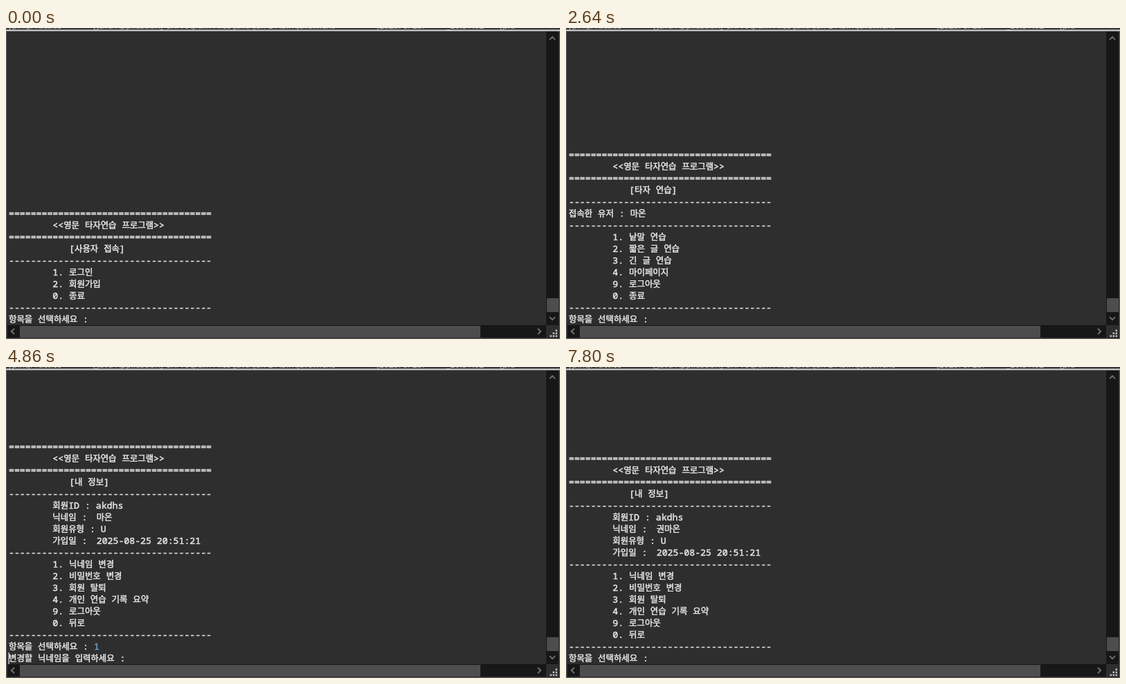
Recreate the animation shown at these times as an HTML page with a canvas. Size 800 by 450 pixels, loop 8 s.

```html
<!DOCTYPE html>
<html lang="ko">
<head>
<meta charset="utf-8">
<title>영문 타자연습 프로그램</title>
<style>
  html, body { margin: 0; width: 100%; height: 100%; overflow: hidden; background: #2f2e2f; }
  canvas { display: block; width: 800px; height: 450px; }
</style>
</head>
<body>
<canvas id="stage" width="800" height="450"></canvas>
<script>
const ctx = document.getElementById('stage').getContext('2d');
const LOOP = 8000;
const CELL = 7.92, WIDE = 11.4, LEFT = 4, ROW = 17, BASE = 426;
const BG = '#2f2e2f', TEXT = '#e6e6e6', INPUT = '#6f9fc4';
const TRACK = '#171717', THUMB = '#4d4d4d', ARROW = '#767676';
const LATIN = '13.2px "Noto Sans Mono", monospace';
const HANGUL = '12.4px "Noto Sans CJK KR", "Noto Sans CJK", sans-serif';

// --- Console contents. "|" starts typed input, a second "|" the syllable being composed.
const BAR = '='.repeat(37), RULE = '-'.repeat(37);
const ASK = '항목을 선택하세요 : ';
const head = title => [BAR, '\t<<영문 타자연습 프로그램>>', BAR, `\t   [${title}]`, RULE];
const menu = (...items) => [...items.map(s => '\t' + s), RULE];

const start = [...head('사용자 접속'), ...menu('1. 로그인', '2. 회원가입', '0. 종료')];
const login = head('로그인');
const main = [...head('타자 연습'), '접속한 유저 : 마온', RULE,
  ...menu('1. 낱말 연습', '2. 짧은 글 연습', '3. 긴 글 연습', '4. 마이페이지', '9. 로그아웃', '0. 종료')];
const profile = nick => [...head('내 정보'),
  ...menu('회원ID : akdhs', `닉네임 :\t${nick}`, '회원유형 : U', '가입일 :\t2025-08-25 20:51:21'),
  ...menu('1. 닉네임 변경', '2. 비밀번호 변경', '3. 회원 탈퇴', '4. 개인 연습 기록 요약', '9. 로그아웃', '0. 뒤로')];

// --- Timeline of console states
const NONE = 0, HOME = 1, END = 2;
const states = [];
const add = (at, rows, caret = NONE, thumbY = 391) => states.push({ at, rows, caret, thumbY });
const type = (at, gap, rows, prompt, word) => [...word].forEach((_, i) =>
  add(at + i * gap, [...rows, `${prompt}|${word.slice(0, i + 1)}`], END));

add(0, [...start, ASK]);
type(780, 60, start, ASK, '1');
add(960, [...start, ASK + '|1', ''], HOME, 386);

const ID = '아이디 : ', PW = '비밀번호 : ';
add(1020, [...login, ID]);
type(1680, 60, login, ID, 'akdhs');
const withId = [...login, ID + '|akdhs'];
add(1980, [...withId, PW], HOME);
type(2220, 60, withId, PW, '1234');
add(2520, [...withId, PW + '|1234', ''], HOME);

add(2640, [...main, ASK]);
type(3660, 60, main, ASK, '4');
add(3780, [...main, ASK + '|4', ''], HOME);

const before = profile('마온'), after = profile('권마온');
add(3840, [...before, ASK]);
type(4560, 60, before, ASK, '1');

const NICK = '변경할 닉네임을 입력하세요 : ';
const chosen = [...before, ASK + '|1'];
add(4740, [...chosen, NICK], HOME);
add(5220, [...chosen, NICK]);
add(5580, [...chosen, NICK], HOME);
type(5820, 60, chosen, NICK, 'rnjs');
[[6180, 'rnj'], [6300, 'rn'], [6360, 'r'], [6480, '']].forEach(([at, left]) =>
  add(at, [...chosen, `${NICK}|${left}`], END));
[[6720, '|ㄱ'], [6960, '|구'], [7020, '|궈'], [7140, '|권'], [7320, '권|ㅁ'],
 [7380, '권|마'], [7440, '권마|ㅇ'], [7500, '권마|오'], [7560, '권마|온']].forEach(([at, s]) =>
  add(at, [...chosen, `${NICK}|${s}`]));
add(7620, [...chosen, `${NICK}|권마온`, ''], HOME);
add(7740, [...after, ASK]);

// --- Drawing
function rect(color, x, y, w, h) {
  ctx.fillStyle = color;
  ctx.fillRect(x, y, w, h);
}

function chevron(x, y, turn) {
  ctx.save();
  ctx.translate(x, y);
  ctx.rotate(turn * Math.PI / 2);
  ctx.beginPath();
  ctx.moveTo(-4, 2);
  ctx.lineTo(0, -2.2);
  ctx.lineTo(4, 2);
  ctx.strokeStyle = ARROW;
  ctx.lineWidth = 1.8;
  ctx.stroke();
  ctx.restore();
}

// A thin outline gives the console type its heavier weight.
function glyph(ch, x, y, color) {
  ctx.fillStyle = ctx.strokeStyle = color;
  ctx.lineWidth = 0.5;
  ctx.fillText(ch, x, y);
  ctx.strokeText(ch, x, y);
}

function put(text, x, y, color, boxed) {
  for (const ch of text) {
    if (ch === '\t') {
      const tab = CELL * 8;
      x = LEFT + (Math.floor((x - LEFT) / tab + 0.001) + 1) * tab;
      continue;
    }
    const wide = ch.charCodeAt(0) > 0x1100;
    if (boxed) rect('#d0d1d0', x - 1, y - 13, WIDE, ROW);
    ctx.font = wide ? HANGUL : LATIN;
    glyph(ch, x, y, color);
    x += wide ? WIDE : CELL;
  }
  return x;
}

function putRow(row, y) {
  const [plain, typed = '', composing = ''] = row.split('|');
  let x = put(plain, LEFT, y, TEXT);
  x = put(typed, x, y, INPUT);
  return put(composing, x, y, '#90603b', true);
}

function drawHeader() {
  rect('#3a3a3b', 0, 0, 800, 4);
  ctx.font = '12.3px "Noto Sans", sans-serif';
  ctx.fillStyle = '#b0b0b0';
  ctx.fillText('TypingPractice', -4, 0.6);
  ctx.fillText('[Java Application] C:\\Program Files\\Java\\jdk-21\\bin\\javaw.exe', 126, 0.6);
  ctx.fillText('(2025. 8. 25.', 535, 0.6);
  ctx.fillText('_20:51:02', 636, 0.6);
  ctx.fillText('[pid', 713, 0.6);
  rect(BG, 0, 4, 800, 446);
  rect('#d8d8d8', 0, 2.5, 800, 2);
}

function drawBars(thumbY) {
  rect(TRACK, 780, 5, 18, 425);
  rect(THUMB, 781, thumbY, 17, 20);
  chevron(789, 15, 0);
  chevron(789, 420, 2);

  rect(TRACK, 2, 430, 778, 18);
  rect(THUMB, 20, 431, 665, 17);
  chevron(10, 439, 3);
  chevron(770, 439, 1);

  for (let i = 0; i < 3; i++)
    for (let j = 2 - i; j < 3; j++) rect('#c0c0c0', 785.5 + 4 * i, 436.5 + 4 * j, 2.5, 2.5);

  rect('#5c5c5c', 0, 5, 1, 445);
  rect('#5c5c5c', 799, 5, 1, 445);
  rect('#5c5c5c', 0, 449, 800, 1);
}

function draw(t) {
  const { rows, caret, thumbY } = states.findLast(s => s.at <= t);
  drawHeader();
  let end = LEFT;
  rows.forEach((row, i) => { end = putRow(row, BASE - (rows.length - 1 - i) * ROW); });
  if (caret) rect('#e8e8e8', caret === HOME ? 3.5 : Math.round(end) - 1, 413, 1.2, ROW);
  drawBars(thumbY);
}

const origin = performance.now();
function tick() {
  draw((performance.now() - origin) % LOOP);
  requestAnimationFrame(tick);
}
tick();
</script>
</body>
</html>
```
